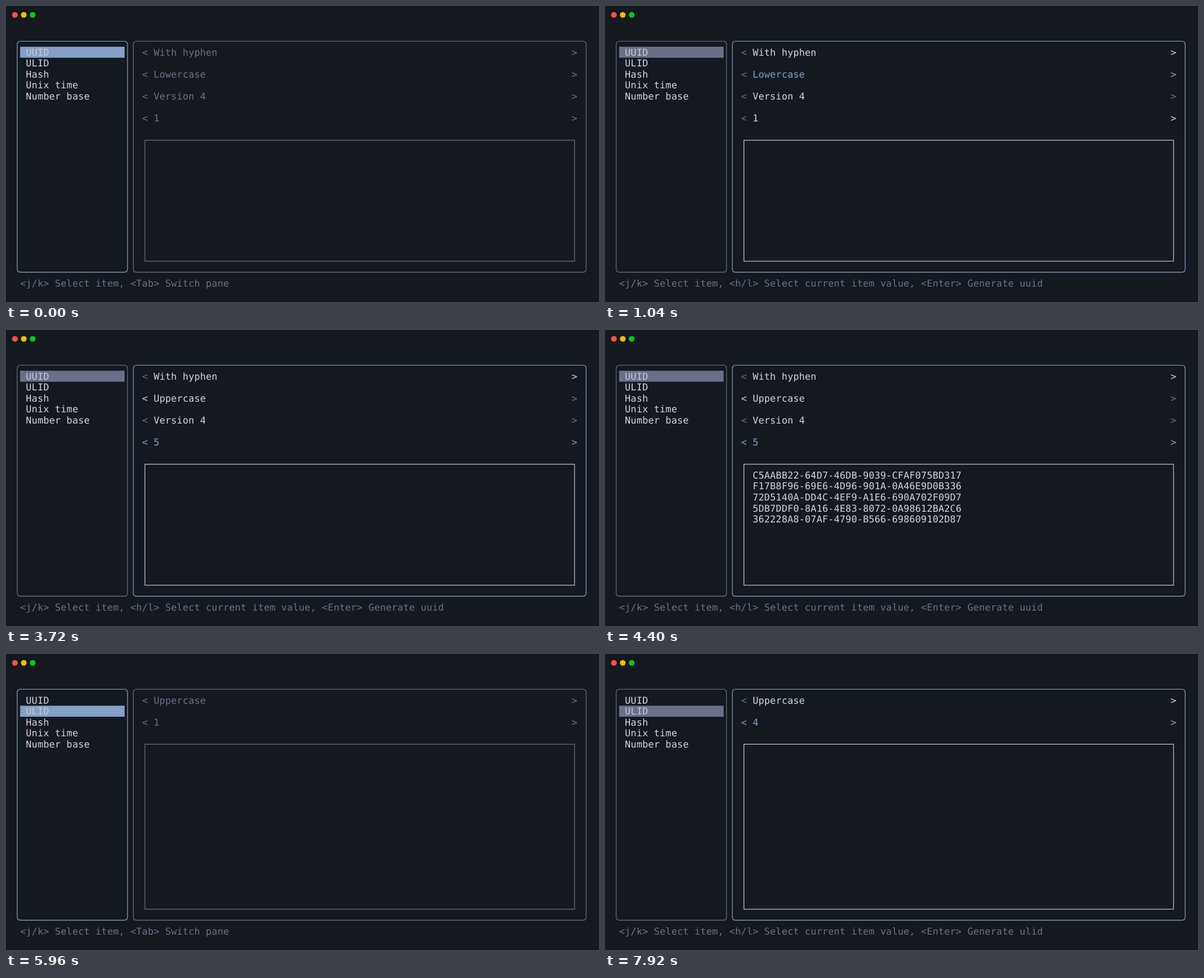
Animation, 1000 px wide and 500 px high, one loop 8 s. Source, as an HTML page:

```html
<!DOCTYPE html>
<html lang="en">
<head>
<meta charset="utf-8">
<title>Generator TUI</title>
<style>
  html, body { margin: 0; width: 100%; height: 100%; overflow: hidden; background: #14191f; }
  svg { display: block; width: 1000px; height: 500px; }
  text {
    font: 16px "DejaVu Sans Mono", monospace;
    letter-spacing: 0.157px;
    text-rendering: geometricPrecision;
    white-space: pre;
  }
</style>
</head>
<body>
<svg viewBox="0 0 1000 500">
  <circle cx="15" cy="15" r="4.8" fill="#ff4f4d"/>
  <circle cx="30" cy="15" r="4.8" fill="#febb00"/>
  <circle cx="45" cy="15" r="4.8" fill="#00cc1d"/>
  <g id="screen"></g>
</svg>
<script>
const LOOP = 8000;
const CELL = { w: 9.79, h: 18.58, x: 14, y: 68.8, ascent: 14.85 };
const C = { text: '#d2d4de', soft: '#c6c8d1', dim: '#6b7089', blue: '#84a0c6' };
const MENU = ['UUID', 'ULID', 'Hash', 'Unix time', 'Number base'];
const UUIDS = [
  'C5AABB22-64D7-46DB-9039-CFAF075BD317',
  'F17B8F96-69E6-4D96-901A-0A46E9D0B336',
  '72D5140A-DD4C-4EF9-A1E6-690A702F09D7',
  '5DB7DDF0-8A16-4E83-8072-0A98612BA2C6',
  '362228A8-07AF-4790-B566-698609102D87',
];

// Each step changes only the listed fields; row -1 means the menu has focus.
const STEPS = [
  [0, { item: 0, row: -1, upper: false, count: 1, out: [] }],
  [480, { row: 0 }],
  [1040, { row: 1 }],
  [1560, { upper: true }],
  [2080, { row: 2 }],
  [2600, { row: 3 }],
  [3160, { count: 2 }],
  [3320, { count: 3 }],
  [3520, { count: 4 }],
  [3720, { count: 5 }],
  [4400, { out: UUIDS }],
  [5400, { row: -1 }],
  [5960, { item: 1, count: 1, out: [] }],
  [6480, { row: 0 }],
  [7000, { row: 1 }],
  [7560, { count: 2 }],
  [7720, { count: 3 }],
  [7920, { count: 4 }],
];

const screen = document.getElementById('screen');
const colX = c => CELL.x + c * CELL.w;
const rowY = r => CELL.y + r * CELL.h;

function add(tag, attrs, content = '') {
  const el = document.createElementNS('http://www.w3.org/2000/svg', tag);
  for (const k in attrs) el.setAttribute(k, attrs[k]);
  el.textContent = content;
  screen.append(el);
}

function print(col, row, str, fill) {
  add('text', { x: colX(col), y: rowY(row) + CELL.ascent, fill }, str);
}

// Border lines run through the middle of their cells.
function box(c0, r0, c1, r1, stroke, rx = 0) {
  add('rect', {
    x: colX(c0 + 0.5), y: rowY(r0 + 0.5),
    width: (c1 - c0) * CELL.w, height: (r1 - r0) * CELL.h,
    rx, fill: 'none', stroke, 'stroke-width': 1.15,
  });
}

// An option is [label, has previous, has next].
function options(s) {
  const count = [String(s.count), s.count > 1, true];
  if (s.item === 1) return [['Uppercase', false, true], count];
  return [
    ['With hyphen', false, true],
    s.upper ? ['Uppercase', true, false] : ['Lowercase', false, true],
    ['Version 4', false, false],
    count,
  ];
}

function draw(s) {
  screen.replaceChildren();
  const active = s.row >= 0;

  box(0, -1, 19, 20, active ? C.dim : C.blue, 5);
  add('rect', {
    x: colX(1), y: rowY(s.item), width: 18 * CELL.w, height: CELL.h,
    fill: active ? C.dim : C.blue,
  });
  MENU.forEach((name, i) => print(2, i, name, i === s.item ? C.soft : C.text));

  box(20, -1, 98, 20, active ? C.blue : C.dim, 5);
  const opts = options(s);
  opts.forEach(([label, prev, next], i) => {
    const color = !active ? C.dim : i === s.row ? C.blue : C.text;
    print(22, i * 2, '<', prev ? color : C.dim);
    print(24, i * 2, label, color);
    print(96, i * 2, '>', next ? color : C.dim);
  });

  const top = opts.length * 2;
  box(22, top, 96, 19, active ? C.soft : C.dim);
  s.out.forEach((line, i) => print(24, top + 1 + i, line, active ? C.text : C.dim));

  print(1, 21, active
    ? `<j/k> Select item, <h/l> Select current item value, <Enter> Generate ${MENU[s.item].toLowerCase()}`
    : '<j/k> Select item, <Tab> Switch pane', C.dim);
}

let shown = -1;
function tick() {
  const t = performance.now() % LOOP;
  const step = STEPS.findLastIndex(([at]) => at <= t);
  if (step !== shown) {
    shown = step;
    draw(Object.assign({}, ...STEPS.slice(0, step + 1).map(([, change]) => change)));
  }
  requestAnimationFrame(tick);
}
tick();
</script>
</body>
</html>
```
